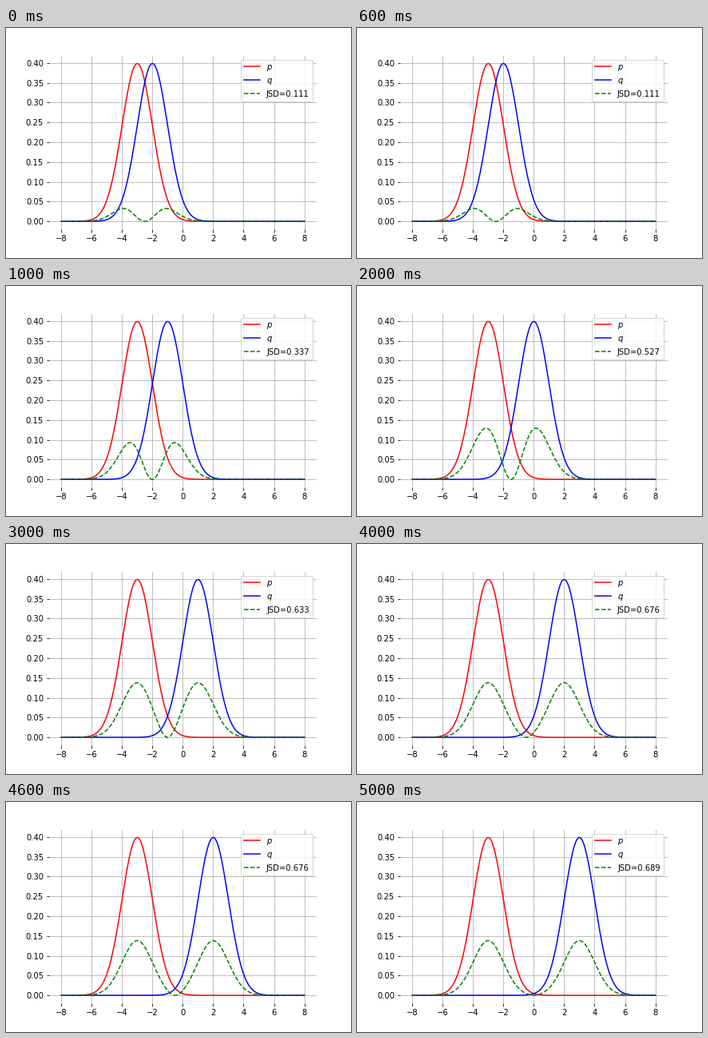
Recreate the animation shown at these times as a matplotlib script. Size 432 by 288 pixels, loop 6000 ms.

```python
import numpy as np
import matplotlib.pyplot as plt
from matplotlib.animation import FuncAnimation

STEPS = 6
P_MEAN = -3

x = np.linspace(-8, 8, 1000)


def normal(mean):
    return np.exp(-(x - mean) ** 2 / 2) / np.sqrt(2 * np.pi)


def js_terms(p, q):
    """Pointwise contribution to the Jensen-Shannon divergence."""
    m = (p + q) / 2
    return (p * np.log(p / m) + q * np.log(q / m)) / 2


plt.rcParams["font.family"] = "DejaVu Sans"
fig, ax = plt.subplots(figsize=(6, 4), dpi=72)
fig.subplots_adjust(left=0.125, right=0.9, bottom=0.125, top=0.88)
ax.set_frame_on(False)
ax.grid(True)

p = normal(P_MEAN)
ax.plot(x, p, "r", label="$p$")
q_line, = ax.plot(x, p, "b", label="$q$")
js_line, = ax.plot(x, 0 * x, "g--", label="JSD=0.000")
ax.set_xlim(-8.8, 8.8)
margin = 0.05 * p.max()
ax.set_ylim(-margin, p.max() + margin)
legend = ax.legend(loc="upper right")


def update(step):
    q = normal(P_MEAN + 1 + step)
    js = js_terms(p, q)
    q_line.set_ydata(q)
    js_line.set_ydata(js)
    total = js.sum() * (x[1] - x[0])
    legend.get_texts()[2].set_text(f"JSD={total:.3f}")
    return q_line, js_line, legend


anim = FuncAnimation(fig, update, frames=STEPS, interval=1000,
                     repeat=True, repeat_delay=0, blit=False)
plt.show()
```
